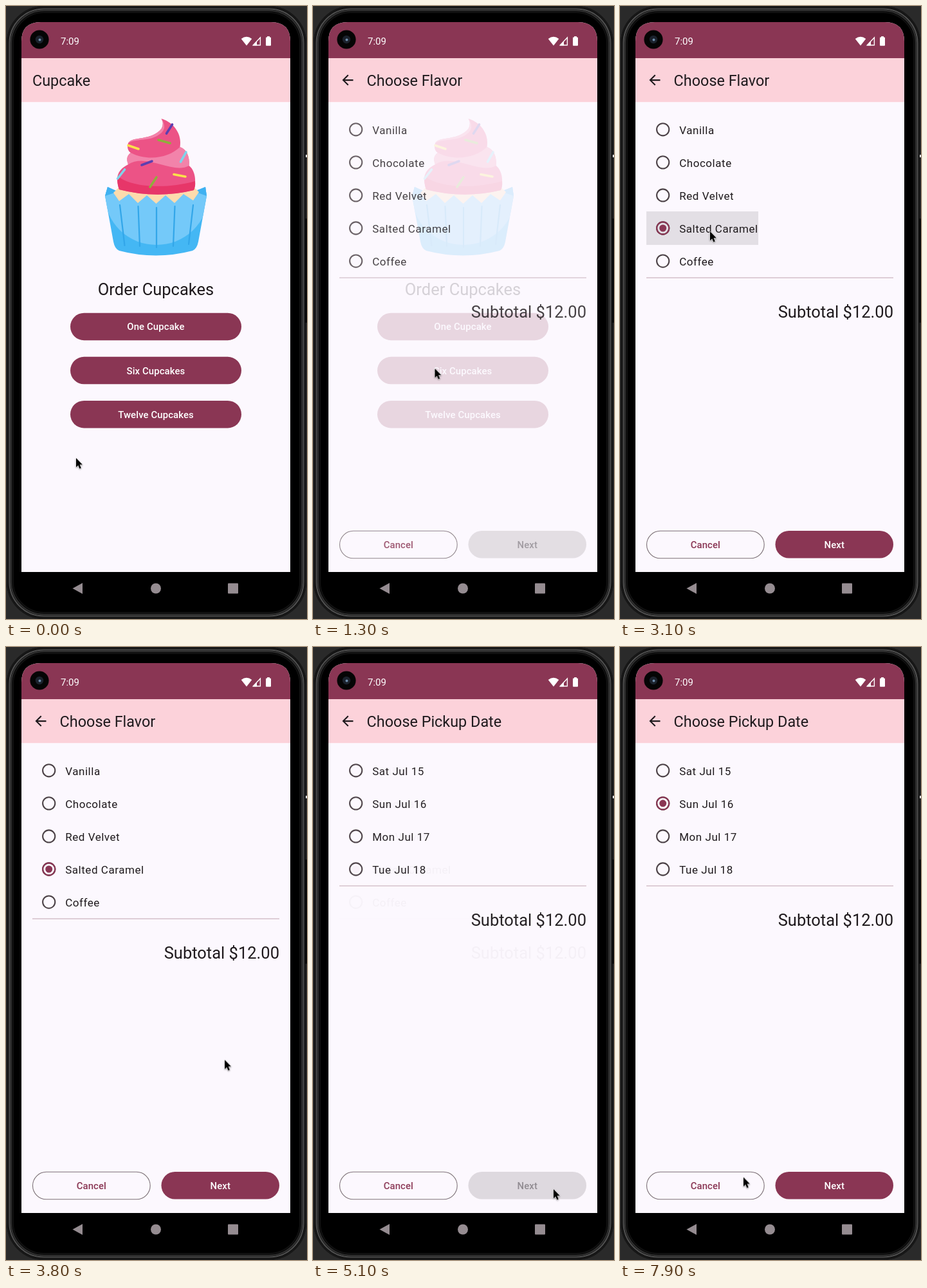
These frames come from a looping animation (468 px wide and 952 px high, 8 s). An HTML page:

```html
<!DOCTYPE html>
<html lang="en">
<head>
<meta charset="utf-8">
<title>Cupcake order</title>
<style>
  html, body { margin: 0; width: 100%; height: 100%; overflow: hidden; background: #2a2a2a; }
  #stage { display: block; width: 100vw; height: 100vh; }
  text { font-family: Roboto, sans-serif; fill: #1f1a1d; white-space: pre; }
  .title { font-size: 23.4px; }
  .head { font-size: 25.5px; }
  .option { font-size: 17.02px; letter-spacing: .53px; }
  .label { font-size: 14.9px; font-weight: 500; letter-spacing: .106px; text-anchor: middle; }
  .grow { transform-box: fill-box; transform-origin: center; }
</style>
</head>
<body>
<svg id="stage" viewBox="0 0 468 952" xmlns="http://www.w3.org/2000/svg"></svg>
<script>
const LOOP = 8000;
const STANDARD = 'cubic-bezier(.4,0,.2,1)';
const PRIMARY = '#8a3654', SURFACE = '#fcf8fe', INK = '#1f1a1d';
const stage = document.getElementById('stage');

const text = (cls, x, y, str, extra = '') => `<text class="${cls}" x="${x}" y="${y}" ${extra}>${str}</text>`;
const rect = (x, y, w, h, rx, fill, extra = '') =>
  `<rect x="${x}" y="${y}" width="${w}" height="${h}" rx="${rx}" fill="${fill}" ${extra}/>`;
const path = (d, fill, extra = '') => `<path d="${d}" fill="${fill}" ${extra}/>`;
const circle = (x, y, r, fill, extra = '') => `<circle cx="${x}" cy="${y}" r="${r}" fill="${fill}" ${extra}/>`;

function pill(x, y, w, label, fill, color, extra) {
  return rect(x, y, w, 42.5, 21.25, fill, extra) +
    text('label', x + w / 2, y + 26.7, label, `style="fill:${color}"`);
}

function ripple(id, [x, y, w, h, rx], cx, cy, color) {
  return `<clipPath id="${id}-clip">${rect(x, y, w, h, rx, '#000')}</clipPath>
    <g clip-path="url(#${id}-clip)">${circle(cx, cy, w * .75, color, `id="${id}" class="grow" opacity="0"`)}</g>`;
}

function phone() {
  const ring = (inset, r, stroke, width) =>
    rect(inset, inset - 1, 468 - 2 * inset, 954 - 2 * inset, r, 'none', `stroke="${stroke}" stroke-width="${width}"`);
  return rect(0, 0, 468, 952, 0, '#2a2a2a') +
    rect(1, 0, 466, 952, 58, '#000') +
    ring(2.5, 56, '#171717', 3) + ring(5.5, 53, '#505050', 2.2) +
    ring(8, 51, '#2e2e2e', 2.4) + ring(11, 48, '#111', 2) +
    rect(465, 330, 3, 162, 1, '#080808') + rect(466, 231, 2, 4, 0, '#ddd') +
    path('M24 879V55Q24 25 54 25H412Q442 25 442 55V879Z', SURFACE) +
    path('M24 81V55Q24 25 54 25H412Q442 25 442 55V81Z', PRIMARY) +
    rect(24, 81, 418, 68.2, 0, '#fcd2da') +
    circle(52, 52, 14.6, '#050505') + circle(52, 52, 6.2, '#1b222c') + circle(52.5, 52.5, 2, '#6d8cab') +
    text('clock', 85, 60, '7:09', 'font-size="15" style="fill:#fff"') +
    path('M374 61.5L365.7 51Q374 44.5 382.3 51Z', '#fff') +
    path('M395.4 49V60.8H384.3Z', 'none', 'stroke="#fff" stroke-width="1.4"') +
    path('M384 61.4L390 55V61.4Z', '#fff') +
    rect(404, 48.5, 8, 13.3, 1, '#fff') + rect(406, 47, 4, 3, .5, '#fff') +
    path('M103.5 904.5L119 896V913Z', '#958c91') + circle(233, 904.5, 8, '#958c91') +
    rect(345, 896.5, 16, 16, 1, '#958c91');
}

function cupcake() {
  const sprinkles = [
    ['#5b3fb0', 'M249.5 198L258.5 184M211 247L227 241'],
    ['#8fae3c', 'M237 208L255 213M224 281L234 266'],
    ['#fbe14a', 'M190 216.5L206 222M261 261.5L279 265'],
    ['#7fd3ea', 'M271.5 242L280 227M173.5 268L184.5 254']
  ];
  const folds = 'M177 309L184.5 372M205.5 311L208 373M234 313V375M262.5 311L260 373M291 309L284 370';
  const cup = 'M158 281L154 295L167 366Q169 377 176 380Q233 395 290 380Q297 377 299 366L312 295L310 281L290 290H176Z';
  return `<clipPath id="cup">${path(cup, '#000')}</clipPath>` +
    path(cup, '#44b7f4') +
    `<g clip-path="url(#cup)"><ellipse cx="234" cy="294" rx="80" ry="77" fill="#74c9f9"/></g>` +
    path('M158 281L154 295L166 291L174 288ZM310 281L312 295L301 291L292 288Z', '#3fb1f1') +
    path(folds, 'none', 'stroke="#32a6e9" stroke-width="2.2" stroke-linecap="round"') +
    path('M167 290L176 303L191 292L205 306L219 294L233.5 307L248 294L262 306L276 292L291 302L300 289L292 281H176Z', '#fddbad') +
    path(`M241.5 175C262 181 274 200 270.5 219C280 222 286 233 284.5 248C293 254 297 270 292 286
      Q234 300 176 285C171 270 170 256 190 246C187 238 188 232 194 228C189 225 188 218 190 213
      C195 202 227 210 242 190Q246 182 241.5 175Z`, '#ec5386') +
    path('M174 264C190 280 245 286 294 272Q295 280 292 286Q234 300 176 285Q172 274 174 264Z', '#e73669') +
    path('M190 246C187 238 188 232 194 228C222 242 254 235 270.5 219C280 222 286 233 284.5 248C260 262 218 228 190 246Z', '#f283aa') +
    path('M190 213C195 202 227 210 242 190Q246 182 241.5 175Q252 190 239 199C224 211 202 205 190 213Z', '#f283aa') +
    sprinkles.map(([c, d]) => path(d, 'none', `stroke="${c}" stroke-width="3.6" stroke-linecap="round"`)).join('');
}

function home() {
  return cupcake() + text('head', 233, 448.6, 'Order Cupcakes', 'text-anchor="middle"') +
    ['One Cupcake', 'Six Cupcakes', 'Twelve Cupcakes']
      .map((label, i) => pill(100, 476.7 + i * 68.1, 266, label, PRIMARY, '#fff')).join('') +
    ripple('six', [100, 544.8, 266, 42.5, 21.25], 190, 565, '#fff');
}

const radioY = i => 191.8 + i * 51.07;

function chooser(id, options, picked, pickedWidth, pressX) {
  const bottom = 166.2 + options.length * 51.07;
  const ringAt = (i, color, extra = '') =>
    circle(66.7, radioY(i), 9.6, 'none', `stroke="${color}" stroke-width="2.1" ${extra}`);
  return ripple(id + '-tap', [41, radioY(picked) - 25.5, pickedWidth, 51, 0], pressX, radioY(picked) + 8, '#000') +
    options.map((name, i) => ringAt(i, '#4c4247') + text('option', 92.2, radioY(i) + 6.7, name)).join('') +
    `<g id="${id}-on">${ringAt(picked, PRIMARY)}</g>` +
    circle(66.7, radioY(picked), 5.5, PRIMARY, `id="${id}-dot" class="grow"`) +
    rect(41, bottom - .3, 384, 1.6, 0, '#d6c3cd') +
    text('head', 425, bottom + 62.2, 'Subtotal $12.00', 'text-anchor="end"') +
    pill(41.5, 815.3, 182.7, 'Cancel', 'none', PRIMARY, 'stroke="#7b6f75" stroke-width="1.1"') +
    `<g id="${id}-off">${pill(241.5, 815, 183.5, 'Next', '#ddd8de', '#8d888e')}</g>` +
    `<g id="${id}-next">${pill(241.5, 815, 183.5, 'Next', PRIMARY, '#fff')}
      ${ripple(id + '-go', [241.5, 815, 183.5, 42.5, 21.25], 374, 842, '#fff')}</g>`;
}

const backArrow = path('M20 11H7.83l5.59-5.59L12 4l-8 8 8 8 1.41-1.41L7.83 13H20v-2z', INK,
  'transform="translate(41.2 102.3) scale(1.064)"');
const group = (id, body) => `<g id="${id}">${body}</g>`;

stage.innerHTML = phone() +
  group('title-home', text('title', 41, 124, 'Cupcake')) +
  group('title-flavor', backArrow + text('title', 83.6, 124, 'Choose Flavor')) +
  group('title-date', backArrow + text('title', 83.6, 124, 'Choose Pickup Date')) +
  group('home', home()) +
  group('flavor', chooser('flavor', ['Vanilla', 'Chocolate', 'Red Velvet', 'Salted Caramel', 'Coffee'], 3, 174, 140)) +
  group('date', chooser('date', ['Sat Jul 15', 'Sun Jul 16', 'Mon Jul 17', 'Tue Jul 18'], 1, 136, 135)) +
  group('cursor', path('M0 0V14.2L3.2 11.3L5.4 16.4L7.8 15.4L5.6 10.3H9.9Z', '#000',
    'stroke="#fff" stroke-width="1" stroke-linejoin="round" paint-order="stroke" style="filter:drop-shadow(0 1px 1px #0006)"'));

// Each step is [time in ms, value, easing towards the next step].
function play(id, prop, steps) {
  const all = [[0, steps[0][1]], ...steps, [LOOP, steps[steps.length - 1][1]]];
  document.getElementById(id).animate(
    all.map(([t, value, easing = 'linear']) => ({ offset: t / LOOP, [prop]: value, easing })),
    { duration: LOOP, iterations: Infinity });
}
const fade = (id, ...steps) => play(id, 'opacity', steps);
const hard = (id, at, from, to) => fade(id, [at, from], [at, to]);

const TO_FLAVOR = 920, TO_DATE = 4560, FADE = 700;

hard('title-home', TO_FLAVOR, 1, 0);
fade('title-flavor', [TO_FLAVOR, 0], [TO_FLAVOR, 1], [TO_DATE, 1], [TO_DATE, 0]);
hard('title-date', TO_DATE, 0, 1);

fade('home', [TO_FLAVOR, 1, STANDARD], [TO_FLAVOR + FADE, 0]);
fade('flavor', [TO_FLAVOR, 0, STANDARD], [TO_FLAVOR + FADE, 1], [TO_DATE, 1, STANDARD], [TO_DATE + FADE, 0]);
fade('date', [TO_DATE, 0, STANDARD], [TO_DATE + FADE, 1]);

function tap(id, press, release, strength) {
  fade(id, [press, 0], [press + 75, strength], [release + 150, strength], [release + 300, 0]);
  play(id, 'transform', [[press, 'scale(.15)', STANDARD], [press + 300, 'scale(1.4)']]);
}
tap('six', 840, 920, .14);
tap('flavor-tap', 2750, 2950, .1);
tap('flavor-go', 4450, 4560, .14);
tap('date-tap', 6660, 6900, .1);

function select(id, at) {
  hard(id + '-off', at, 1, 0);
  hard(id + '-next', at, 0, 1);
  fade(id + '-on', [at, 0], [at + 100, 1]);
  play(id + '-dot', 'transform', [[at, 'scale(0)'], [at + 100, 'scale(1)']]);
}
select('flavor', 2950);
select('date', 6900);

play('cursor', 'transform', [
  [60, 109, 702, 'ease-in-out'], [700, 189.5, 563],
  [1620, 189.5, 563, 'ease-in-out'], [2300, 120, 403, 'ease-in-out'], [2600, 140, 350],
  [3250, 140, 350, 'ease-in'], [3800, 340, 640.5, 'ease-out'], [4300, 374, 842],
  [5420, 374, 842, 'ease-in-out'], [6300, 146, 266], [6500, 135, 250.5],
  [7200, 135, 250.5, 'ease-in'], [7550, 236, 590, 'ease-out'], [7900, 192, 823.5]
].map(([t, x, y, easing]) => [t, `translate(${x}px, ${y}px)`, easing]));
</script>
</body>
</html>
```
